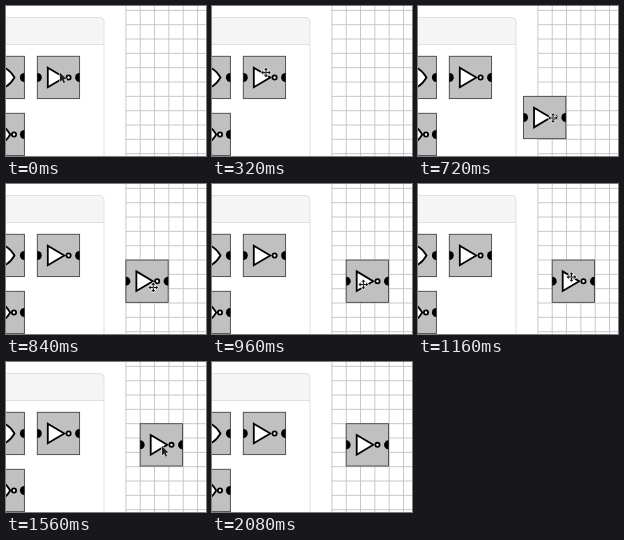
An HTML page with a canvas that plays this animation: 200x150 px, repeating every 2880 ms.

```html
<!DOCTYPE html>
<html lang="en">
<head>
<meta charset="utf-8">
<title>Dragging a gate</title>
<style>
html, body { margin: 0; width: 100%; height: 100%; overflow: hidden; background: #fff; }
canvas { display: block; width: 200px; height: 150px; }
</style>
</head>
<body>
<canvas id="stage" width="200" height="150"></canvas>
<script>
const ctx = document.getElementById('stage').getContext('2d');
const LOOP = 2880, STEP = 40;
const CELL = 14.33, GRID_X = 134.2, GRID_Y = 61.7, TILE = 42.3;
const HOVER = 320, DRAG = 560, DROP = 1560, GONE = 2080;
const GRAB_X = 16.8, GRAB_Y = 17.4, LAG = 15;

const power = p => k => k ** p;
const linear = power(1);
const easeOut = k => 1 - (1 - k) ** 2;

// Pointer moves, each starting where the last one ended
const moves = [
  { from: 480, to: 720, x: 135, y: 112, easeX: power(2.5), easeY: power(0.64) },
  { from: 720, to: 960, x: 151.4, y: 100.5, easeX: easeOut, easeY: easeOut },
  { from: 960, to: 1400, x: 156, y: 84, easeX: linear, easeY: linear },
  { from: 1920, to: 2040, x: 172, y: 136, easeX: power(2), easeY: power(2) }
];

function pointerAt(t) {
  let x = 54, y = 66.5;
  for (const m of moves) {
    const k = Math.min(1, Math.max(0, (t - m.from) / (m.to - m.from)));
    x += (m.x - x) * m.easeX(k);
    y += (m.y - y) * m.easeY(k);
    if (k < 1) break;
  }
  return [x, y];
}

// The dragged tile trails the pointer slightly and snaps to the grid
function tileAt(t) {
  const [x, y] = pointerAt(Math.min(t, DROP) - LAG);
  const snap = (v, origin) => origin + CELL * Math.floor((v - origin) / CELL);
  return [snap(x - GRAB_X, GRID_X), snap(y - GRAB_Y, GRID_Y)];
}

function line(x0, y0, x1, y1) {
  ctx.beginPath();
  ctx.moveTo(x0, y0);
  ctx.lineTo(x1, y1);
  ctx.stroke();
}

function drawPanel() {
  ctx.beginPath();
  ctx.roundRect(-20, 11.5, 118, 180, 4);
  ctx.fillStyle = '#fff';
  ctx.fill();
  ctx.save();
  ctx.clip();
  ctx.fillStyle = '#f5f5f5';
  ctx.fillRect(0, 11, 98, 27.5);
  ctx.restore();
  ctx.strokeStyle = '#e0e0e0';
  ctx.lineWidth = 1;
  ctx.stroke();
  line(0, 38.5, 98, 38.5);
}

function drawGrid() {
  ctx.strokeStyle = '#c2c2c2';
  ctx.lineWidth = 0.9;
  const left = GRID_X - CELL;
  for (let x = left; x < 200; x += CELL) line(x, 0, x, 150);
  for (let y = GRID_Y - 4 * CELL; y < 150; y += CELL) line(left, y, 200, y);
}

function port(x, y, toRight) {
  ctx.beginPath();
  ctx.arc(x, y, 4.5, -Math.PI / 2, Math.PI / 2, !toRight);
  ctx.fillStyle = '#000';
  ctx.fill();
}

function box(x, y) {
  ctx.fillStyle = '#c0c0c0';
  ctx.fillRect(x, y, TILE, TILE);
  ctx.strokeStyle = '#444';
  ctx.lineWidth = 0.9;
  ctx.strokeRect(x, y, TILE, TILE);
  port(x, y + TILE / 2, true);
  port(x + TILE, y + TILE / 2, false);
}

function ink() {
  ctx.fillStyle = '#fff';
  ctx.fill();
  ctx.strokeStyle = '#000';
  ctx.lineWidth = 1.8;
  ctx.lineJoin = 'miter';
  ctx.stroke();
}

function bubble(x, y) {
  ctx.beginPath();
  ctx.arc(x, y, 2.1, 0, 7);
  ink();
}

function notGate(x, y) {
  box(x, y);
  const mid = y + TILE / 2;
  poly([[x + 10.5, mid - 9.8], [x + 27, mid], [x + 10.5, mid + 9.8]]);
  ink();
  bubble(x + 31.3, mid);
}

function orGate(x, y, tip, inverted) {
  box(x, y);
  const mid = y + TILE / 2, end = x + tip;
  ctx.beginPath();
  ctx.moveTo(end - 23, mid - 10.5);
  ctx.lineTo(end - 12, mid - 10.5);
  ctx.quadraticCurveTo(end - 5, mid - 8.5, end, mid);
  ctx.quadraticCurveTo(end - 5, mid + 8.5, end - 12, mid + 10.5);
  ctx.lineTo(end - 23, mid + 10.5);
  ctx.quadraticCurveTo(end - 18, mid, end - 23, mid - 10.5);
  ink();
  if (inverted) bubble(end + 3.8, mid);
}

function poly(points) {
  ctx.beginPath();
  points.forEach(([x, y]) => ctx.lineTo(x, y));
  ctx.closePath();
}

function drawArrow(x, y) {
  ctx.save();
  ctx.translate(x, y);
  poly([[0, 0], [0, 9.2], [2.1, 7.4], [3.7, 10.8], [5.1, 10.1], [3.7, 6.8], [6.4, 6.6]]);
  ctx.lineJoin = 'round';
  ctx.strokeStyle = '#ddd';
  ctx.lineWidth = 1.2;
  ctx.stroke();
  ctx.fillStyle = '#222';
  ctx.fill();
  ctx.restore();
}

function drawMove(x, y) {
  ctx.save();
  ctx.translate(x, y);
  ctx.lineJoin = 'round';
  ctx.strokeStyle = '#eee';
  ctx.lineWidth = 1.5;
  ctx.fillStyle = '#111';
  for (const paint of ['stroke', 'fill']) {
    for (let i = 0; i < 4; i++) {
      poly([[0, 0], [-0.5, -0.5], [-0.5, -2.7], [-2, -2.7],
        [0, -4.8], [2, -2.7], [0.5, -2.7], [0.5, -0.5]]);
      ctx[paint]();
      ctx.rotate(Math.PI / 2);
    }
  }
  ctx.restore();
}

function draw(t) {
  ctx.fillStyle = '#fff';
  ctx.fillRect(0, 0, 200, 150);
  drawGrid();
  drawPanel();
  orGate(-23.9, 50.3, 32.4, false);
  notGate(31.3, 50.3);
  orGate(-23.9, 107.3, 28.1, true);

  if (t >= DRAG) notGate(...tileAt(t));
  if (t < GONE) {
    const cursor = t >= HOVER && t < DROP ? drawMove : drawArrow;
    cursor(...pointerAt(t));
  }
}

const start = performance.now();
function tick() {
  const t = (performance.now() - start) % LOOP;
  draw(Math.floor(t / STEP) * STEP);
  requestAnimationFrame(tick);
}
tick();
</script>
</body>
</html>
```
